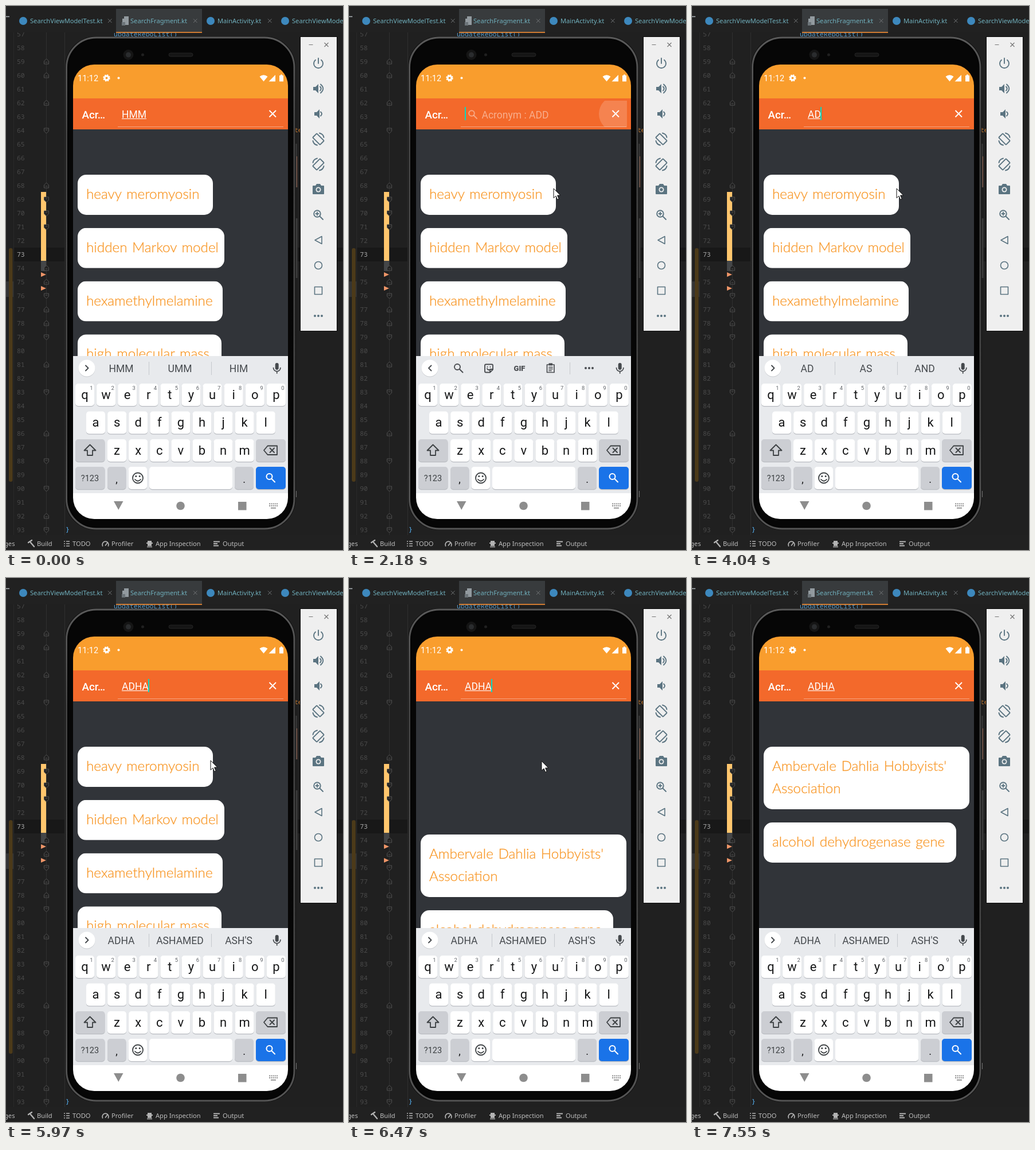
Animation, 588 px wide and 948 px high, one loop 8000 ms. Source, as an HTML page:

```html
<!DOCTYPE html>
<html lang="en">
<head>
<meta charset="utf-8">
<title>Acronym search</title>
<style>
html, body { margin: 0; width: 100%; height: 100%; overflow: hidden; background: #202020; }
svg { display: block; font-family: Roboto, sans-serif; }
.ide { font: 11.15px "Noto Sans", "Open Sans", sans-serif; }
.mono { font: 11.4px "Noto Sans Mono", "DejaVu Sans Mono", monospace; }
.hand { font: 300 24.3px Lato, sans-serif; word-spacing: 2px; fill: #f8992b; stroke: #f8992b; stroke-width: .35px; }
.mid { text-anchor: middle; }
.line { fill: none; stroke-linecap: round; stroke-linejoin: round; }

#old, .card, #fresh, #ripple, #pointer { animation: 8s linear infinite; }
#old { animation-name: fade; }
.card { animation-name: pack; }
#fresh { animation-name: rise; }
#ripple { animation-name: ripple; transform-origin: 467px 188px; }
#pointer { animation-name: roam; }

@keyframes fade {
  0%, 76.3% { opacity: 1; }
  79.1%, 100% { opacity: 0; }
}
@keyframes pack {
  0%, 76.1% { transform: translateY(calc(var(--i) * 92.8px)); }
  76.11%, 100% { transform: translateY(calc(var(--i) * 85px)); }
}
@keyframes rise {
  0%, 80% { transform: translateY(320px); }
  80.6%, 81.4% { transform: translateY(153px); animation-timing-function: ease-out; }
  82.25%, 100% { transform: none; }
}
@keyframes ripple {
  0%, 22.6% { transform: scale(.3); opacity: 0; }
  22.8% { transform: scale(.5); opacity: .18; }
  25%, 27.4% { transform: none; opacity: .18; }
  30.6%, 100% { transform: none; opacity: 0; }
}
@keyframes roam {
  0%, .8% { transform: translate(499px, 720px); animation-timing-function: ease-out; }
  3.5%, 7.4% { transform: translate(440px, 314px); animation-timing-function: ease-in-out; }
  13.5%, 23.5% { transform: translate(462px, 187px); animation-timing-function: ease-in-out; }
  26.7%, 79.75% { transform: translate(357px, 318px); }
  80.6%, 83.5% { transform: translate(336px, 319px); animation-timing-function: ease-in; }
  90% { transform: translate(465px, 690px); }
  93.75%, 100% { transform: translate(449px, 940px); }
}
</style>
</head>
<body>
<svg width="588" height="948" viewBox="0 0 588 948">
  <defs>
    <clipPath id="screen"><rect x="117" y="102" width="375" height="792" rx="37"/></clipPath>
    <clipPath id="list"><rect x="117" y="215" width="375" height="395"/></clipPath>
    <clipPath id="close"><rect x="430" y="165" width="54.5" height="46"/></clipPath>
    <linearGradient id="rim" x2="0" y2="1">
      <stop stop-color="#5a5a5a"/><stop offset=".2" stop-color="#404040"/>
      <stop offset=".8" stop-color="#444"/><stop offset="1" stop-color="#555"/>
    </linearGradient>
  </defs>

  <!-- editor -->
  <rect width="588" height="948" fill="#202020"/>
  <path d="M13.5 46V922" stroke="#2a2a2a"/>
  <path d="M14 421H588V445H14Z" fill="#181818"/>
  <path d="M70.5 46V922M102.5 46V922" stroke="#303030"/>
  <rect y="480" width="13" height="27" fill="#343434"/>
  <rect x="5" y="422" width="6.500" height="407" rx="3" fill="#4c3a19"/>
  <rect x="61" y="324" width="9" height="120" fill="#ffc66d"/>
  <rect x="61" y="444" width="9" height="18" fill="#444648"/>
  <path d="M61 464l9 4-9 4zM61 488l9 4-9 4z" fill="#ee9568"/>
  <g id="gutter"></g>
  <text class="mono" x="188" y="53" fill="#5699c8" style="font-size:11.6px">updateRepoList()</text>
  <text class="mono" x="104" y="916" fill="#4f9fd8">}</text>
  <text class="mono" x="503" y="220" fill="#d58436">te</text>
  <rect x="504" y="262" width="4" height="54" fill="#e8875f"/>
  <path d="M506.500 845v11" stroke="#777"/>

  <!-- tabs -->
  <rect width="588" height="46" fill="#212121"/>
  <rect x="192" y="5" width="150" height="41" fill="#383b3d"/>
  <rect x="192" y="45" width="150" height="2" fill="#cf7b32"/>
  <path d="M0 18.500h6" stroke="#aeb4b8" stroke-width="1.500"/>
  <path d="M206 18h8v15h-8v-5h-3v-6h3z" fill="#929a9f"/>
  <path d="M202 28h6v6h-6z" fill="#6c7479"/>
  <g class="ide" id="tabs" fill="#70b0bd"></g>

  <!-- tool windows -->
  <rect y="922" width="588" height="26" fill="#212121"/>
  <g class="ide" id="tools" fill="#bdbdbd"></g>
  <g fill="#b3b3b3" stroke="#b3b3b3">
    <path class="line" d="M43 935l6 7M39 935l6-4" stroke-width="2.400"/>
    <path d="M105 933h6M105 937h6M105 941h6M101 933h2M101 937h2M101 941h2" stroke-width="1.500"/>
    <path class="line" d="M168.500 941a5.500 5.500 0 1 1 10 0M173.500 940l3-4" stroke-width="1.700"/>
    <path d="M247 932h7v3h2v2h-2v4h-7v-4h-2v-2h2z" stroke="none"/><path d="M246 942.500h9" stroke-width="1.500"/>
    <path d="M362 933.500h11M362 937h7M362 940.500h9" stroke-width="1.800"/>
  </g>

  <!-- phone -->
  <path d="M506 240v76M507 370v104" stroke="#3c3c3c" stroke-width="3"/>
  <rect x="103" y="53" width="402.500" height="860" rx="54" fill="#0c0c0c"/>
  <rect x="105.500" y="55" width="397.500" height="856" rx="52" fill="#050505" stroke="url(#rim)" stroke-width="3"/>
  <rect x="110" y="59" width="389" height="848" rx="47" fill="#060606"/>
  <rect x="284" y="82" width="42" height="6" rx="3" fill="#151515" stroke="#242424"/>
  <circle cx="213.500" cy="85" r="9" fill="#151515"/><circle cx="213.500" cy="85" r="4.500" fill="#2a2c2e"/>
  <circle cx="238.500" cy="85" r="2.500" fill="#202020"/>
  <text class="mono" x="104" y="916" fill="#4f9fd8">}</text>

  <g clip-path="url(#screen)">
    <rect x="117" y="102" width="375" height="60" fill="#f99d2d"/>
    <rect x="117" y="161" width="375" height="54" fill="#f3692b"/>
    <rect x="117" y="215" width="375" height="395" fill="#313439"/>

    <!-- status bar -->
    <text x="125" y="131" font-size="14.500" fill="#fff">11:12</text>
    <g fill="none" stroke="#fff">
      <circle cx="175.500" cy="125.500" r="3.500" stroke-width="3"/>
      <circle cx="175.500" cy="125.500" r="5.300" stroke-width="1.800" stroke-dasharray="2.400 1.760"/>
    </g>
    <g fill="#fff">
      <circle cx="196.500" cy="125.500" r="2"/>
      <path d="M442.500 123q7-5.500 14 0l-7 8.500zM470 120v11.500h-11.500zM477 121h2v-1.500h3V121h2v10.500h-7z"/>
    </g>

    <!-- search bar -->
    <text x="132.500" y="195.500" font-size="18.800" font-weight="500" fill="#fff">Acr…</text>
    <path d="M195 210.500h289" stroke="#fff" stroke-opacity=".4"/>
    <g data-on="1900 3180" fill="#fff" fill-opacity=".46">
      <g class="line" stroke="#fff" stroke-opacity=".4" stroke-width="2"><circle cx="214" cy="187" r="4.800"/><path d="M218 191l5 5"/></g>
      <text x="231.500" y="195.500" font-size="17.500">Acronym : ADD</text>
    </g>
    <g id="field" fill="#fff" font-size="17.500"></g>
    <g clip-path="url(#close)"><circle id="ripple" cx="467" cy="188" r="31" fill="#fff" opacity="0"/></g>
    <path d="M459.500 182l11.500 11.500m0-11.500l-11.500 11.500" stroke="#fff" stroke-width="1.900"/>

    <!-- results -->
    <g clip-path="url(#list)">
      <g id="old"></g>
      <g id="fresh">
        <rect x="125" y="294" width="359" height="109" rx="15" fill="#fff"/>
        <text class="hand" x="140" y="336">Ambervale Dahlia Hobbyists'</text>
        <text class="hand" x="140" y="375">Association</text>
        <rect x="125" y="426" width="336" height="70" rx="15" fill="#fff"/>
        <text class="hand" x="140" y="468">alcohol dehydrogenase gene</text>
      </g>
    </g>

    <!-- keyboard -->
    <rect x="117" y="610" width="375" height="240" fill="#e8eaed"/>
    <circle cx="141" cy="632" r="14.500" fill="#c9ccd0"/><circle cx="141" cy="631" r="14.500" fill="#fff"/>
    <g id="strip" fill="#464a4e" font-size="17.500"></g>
    <g data-on="1970 3380" fill="#4a4d51">
      <g class="line" stroke="#4a4d51" stroke-width="1.900">
        <path d="M143.500 626.500l-4.500 4.500 4.500 4.500"/>
        <circle cx="189" cy="629" r="5"/><path d="M193 633l5.500 5.500"/>
        <path d="M239 624.500h10q2 0 2 2v7l-5 5h-7q-2 0-2-2v-10q0-2 2-2zM246 638v-5h5M241 632q2 3 4 2"/>
        <path d="M345.500 625h12.500v13.500h-12.500zM349 629.500h6M349 632.500h6M349 635.500h4" stroke-width="1.700"/>
      </g>
      <path d="M348.500 622.500h6.500v4h-6.500z"/>
      <circle cx="241.500" cy="629" r="1.100"/><circle cx="246.500" cy="629" r="1.100"/>
      <text class="mid" x="297.500" y="635.500" font-size="13" font-weight="900">GIF</text>
      <path d="M385.500 621v21" stroke="#c6c9cd"/>
      <circle cx="413" cy="631" r="2"/><circle cx="419" cy="631" r="2"/><circle cx="425" cy="631" r="2"/>
    </g>
    <rect x="469.700" y="622" width="6" height="12" rx="3" fill="#45494d"/>
    <path class="line" d="M466.500 630.500a6.200 6.200 0 0 0 12.400 0M472.700 637v3" stroke="#45494d" stroke-width="1.700"/>
    <g id="keys"></g>
    <g class="line" stroke="#3c4043" stroke-width="1.800">
      <path d="M146.500 764.500l-10 10h5.500v8.500h9v-8.500h5.500z"/>
      <path d="M456.500 766.500h16.500v15.500h-16.500l-6.500-7.750zM460.500 770.500l7.500 7.500m0-7.500l-7.500 7.500"/>
      <circle cx="230" cy="822.500" r="9"/><path d="M225 825q5 5.500 10 0"/>
    </g>
    <circle cx="226.800" cy="819.500" r="1.500" fill="#3c4043"/><circle cx="233.200" cy="819.500" r="1.500" fill="#3c4043"/>
    <g class="line" stroke="#fff" stroke-width="2.100"><circle cx="459.500" cy="820" r="5"/><path d="M463.500 824l5.500 5.500"/></g>

    <!-- navigation -->
    <rect x="117" y="849" width="375" height="46" fill="#fff"/>
    <path d="M188 863h16.500l-8.250 15zM405 864h14.500v14.500H405z" fill="#8d8d8d"/>
    <circle cx="304.500" cy="871" r="7.300" fill="#8d8d8d"/>
    <path d="M459 867.500h15M459 871h15" stroke="#8d8d8d" stroke-width="2" stroke-dasharray="2 1.250"/>
    <path d="M462 874.800h9" stroke="#8d8d8d" stroke-width="1.800"/>
  </g>

  <!-- emulator controls -->
  <rect x="513.500" y="53.500" width="64" height="513" fill="#efefef" stroke="#0a0a0a"/>
  <path d="M528.500 67.500h7M555.500 64l7 7m0-7l-7 7" stroke="#777" stroke-width="1.200"/>
  <g class="line" stroke="#5b7481" stroke-width="1.900">
    <path d="M545 91v9M540 94a8 8 0 1 0 10 0"/>
    <path d="M548 140.500q3.500 3.500 0 7M549 136.500q8.500 7.500 0 15M549 184.500q4 3.500 0 7"/>
    <g id="turn"><rect x="-5" y="-9" width="10" height="18" rx="1" transform="translate(545 232) rotate(-45)"/><path d="M535.500 235q1 6 7.500 7.500M547 221.500q6.500 1.500 7.500 7.500"/></g>
    <use href="#turn" transform="matrix(-1 0 0 1 1090 44)"/>
    <circle cx="543" cy="362" r="5.800"/><path d="M547.500 366.500l5.500 5.500M540.500 362h5M543 359.500v5"/>
    <path d="M551 401.500v13l-12-6.500z" stroke-width="1.600"/>
    <circle cx="545" cy="452" r="6.500" stroke-width="1.600"/>
    <path d="M538.500 489.500h13v13h-13z" stroke-width="1.600"/>
  </g>
  <g fill="#5b7481">
    <path d="M536 141h4l5-5v16l-5-5h-4zM538 185h4l5-5v16l-5-5h-4z"/>
    <path d="M536 313h4l2-3h6l2 3h4q1 0 1 1v13q0 1-1 1h-18q-1 0-1-1v-13q0-1 1-1z"/>
    <circle cx="545" cy="320" r="4.500" fill="#efefef"/><circle cx="545" cy="320" r="2.700"/>
    <circle cx="539" cy="540" r="2"/><circle cx="545" cy="540" r="2"/><circle cx="551" cy="540" r="2"/>
  </g>

  <g data-on="70 7550"><path id="pointer" d="M0 0V16.500L4 13L6.600 19.300L9.200 18.200L6.600 12H11.800Z" fill="#fff" stroke="#111"/></g>
</svg>
<script>
const LOOP = 8000;
const $ = id => document.getElementById(id);
const fill = (id, parts) => { $(id).innerHTML = parts.join(''); };

// editor gutter
const up = [59, 60, 62, 68, 74, 75, 77, 78, 81, 86, 92];
const down = [64, 69, 70, 71, 76, 79, 83, 88, 90, 93];
const gutter = [];
for (let n = 57; n <= 93; n++) {
  const y = 49 + (n - 57) * 24;
  gutter.push(`<text class="mono" x="19" y="${y + 4}" fill="${n === 73 ? '#a9a9a9' : '#4a4a4a'}">${n}</text>`);
  const flip = down.includes(n) ? -1 : 1;
  if (flip < 0 || up.includes(n))
    gutter.push(`<path d="M-4 4V-1L0 -5L4 -1V4ZM-2 1H2" transform="translate(70.5 ${y}) scale(1 ${flip})" fill="#202020" stroke="#505050"/>`);
}
fill('gutter', gutter);

// tab: name, text x, close x, has a round icon
fill('tabs', [
  ['SearchViewModelTest.kt', 42, 181, 1], ['SearchFragment.kt', 217, 330, 0],
  ['MainActivity.kt', 369, 460, 1], ['SearchViewModel.kt', 499, 640, 1]
].map(([name, x, end, dot]) =>
  `<text x="${x}" y="30">${name}</text>` +
  `<path d="M${end - 3} 22.500l6.500 6.500m0-6.500l-6.500 6.500" stroke="#707375"/>` +
  (dot ? `<circle cx="${x - 12}" cy="26" r="7" fill="#3d88bd"/>` : '')));

fill('tools', [['ges', -3], ['Build', 54], ['TODO', 116], ['Profiler', 184], ['App Inspection', 261], ['Output', 378]]
  .map(([name, x]) => `<text x="${x}" y="941">${name}</text>`));

fill('old', [['heavy meromyosin', 236], ['hidden Markov model', 256], ['hexamethylmelamine', 253], ['high molecular mass', 251]]
  .map(([text, w], i) => `<g class="card" style="--i:${i}"><rect x="125" y="294" width="${w}" height="70" rx="15" fill="#fff"/>` +
    `<text class="hand" x="140" y="336">${text}</text></g>`));

// keyboard
const key = (x, y, w, color = '#fff') =>
  `<rect x="${x}" y="${y + 1.2}" width="${w}" height="39" rx="5" fill="#b9bcc1"/>` +
  `<rect x="${x}" y="${y}" width="${w}" height="39" rx="5" fill="${color}"/>`;
const label = (x, y, text, size = 22, color = '#161718') =>
  `<text class="mid" x="${x}" y="${y}" font-size="${size}" fill="${color}">${text}</text>`;
const gray = '#ccced3';
const keys = [];
[['qwertyuiop', 121, 658], ['asdfghjkl', 140, 706.5], ['zxcvbnm', 177, 755]].forEach(([row, x0, y], r) =>
  [...row].forEach((c, i) => {
    const x = x0 + i * 37.1;
    keys.push(key(x, y, 33), label(x + 16.500, y + 26.500, c));
    if (!r) keys.push(label(x + 28, y + 10.500, (i + 1) % 10, 9.5, '#5f6368'));
  }));
keys.push(
  key(121, 755, 51.5, gray), key(436, 755, 52, gray),
  key(121, 803, 51.5, gray), label(146.500, 828, '?123', 14.5, '#3c4043'),
  key(177, 803, 32.5, gray), label(193, 831, ',', 18),
  key(213.500, 803, 32.5), key(250, 803, 145),
  key(399, 803, 33, gray), label(415.500, 831, '.', 18),
  key(436, 803, 52, '#1a73e8'));
fill('keys', keys);

// typed text, then underline widths, then the text cursor
const typed = [['HMM', '0 1900'], ['A', '3180 3780'], ['AD', '3780 4240'], ['ADH', '4240 4770'], ['ADHA', '4770 8000']];
const hints = [
  [['HMM', 'UMM', 'HIM'], '0 1970', 43],
  [['A', 'S', 'AS'], '3380 4040', 11.4],
  [['AD', 'AS', 'AND'], '4040 4440', 23],
  [['ADH', 'ASH', 'ADHERE'], '4440 4970', 35.4],
  [['ADHA', 'ASHAMED', "ASH'S"], '4970 8000', 47]
];
const carets = [
  [244.5, '280 780 1280 1830'], [202, '1900 2450 2910 3180'], [213, '3180 3780'],
  [224, '3780 4240'], [236.8, '4240 4770'], [248, '4770 5430 5970 6510 7030 7550']
];
fill('field', [
  ...typed.map(([s, on]) => `<text data-on="${on}" x="202" y="194.500">${s}</text>`),
  ...hints.map(([, on, w], i) => `<rect data-on="${i ? on : '0 1900'}" x="202" y="196" width="${w}" height="1"/>`),
  ...carets.map(([x, on]) => `<rect data-on="${on}" x="${x}" y="176" width="2" height="23" fill="#03dac5"/>`)
]);
fill('strip', hints.map(([words, on]) => `<g data-on="${on}">` +
  words.map((s, i) => `<text class="mid" x="${201 + i * 102.500}" y="638">${s}</text>`).join('') +
  '<path d="M249.500 620v23M358.500 620v23" stroke="#c6c9cd"/>' +
  '<path class="line" d="M139 626.500l4.500 4.500-4.500 4.500" stroke="#45494d" stroke-width="1.900"/></g>'));

// data-on lists on/off times in ms; a small lead keeps edges on time
const at = t => t <= 0 ? 0 : t >= LOOP ? 1 : (t - 20) / LOOP;
for (const el of document.querySelectorAll('[data-on]')) {
  const frame = (opacity, offset) => ({ opacity, offset, easing: 'step-end' });
  const marks = el.dataset.on.split(' ').map((t, i) => frame(i % 2 ? 0 : 1, at(+t)));
  if (marks[0].offset > 0) marks.unshift(frame(0, 0));
  if (marks.at(-1).offset < 1) marks.push(frame(0, 1));
  el.animate(marks, { duration: LOOP, iterations: Infinity });
}
</script>
</body>
</html>
```
